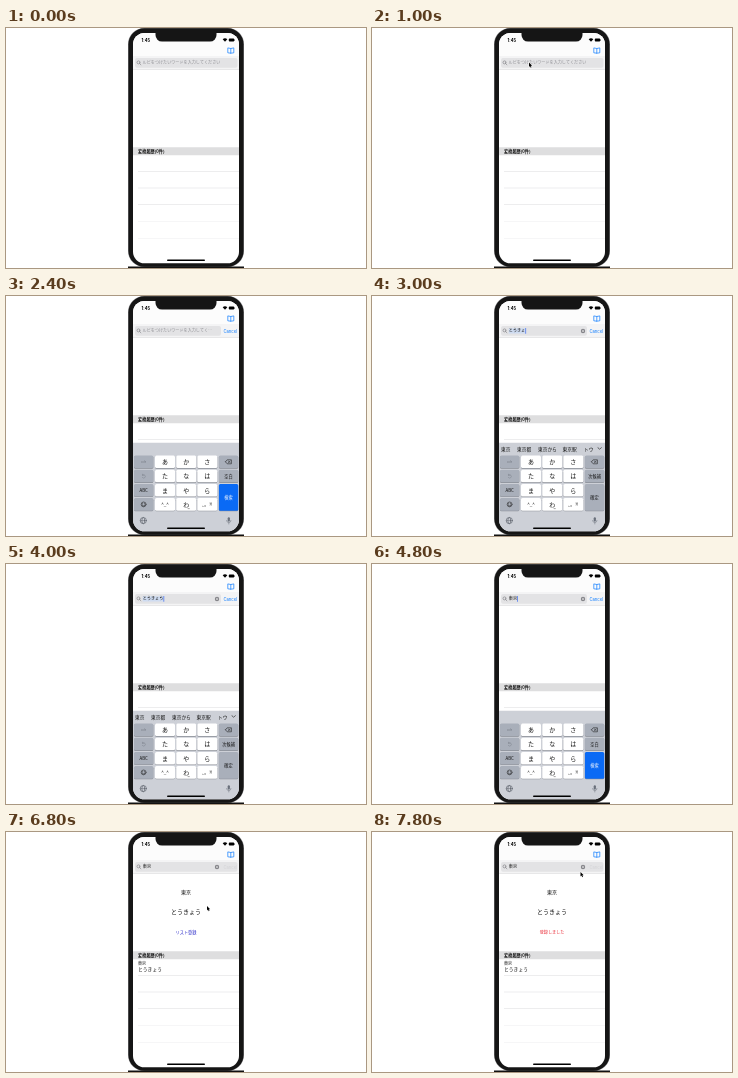
Recreate the animation shown at these times as an HTML page with a canvas. Size 360 px wide and 240 px high, loop 8 s.

```html
<!DOCTYPE html>
<html lang="ja">
<head>
<meta charset="utf-8">
<title>ルビ変換</title>
<style>
html, body { margin: 0; width: 100%; height: 100%; overflow: hidden; background: #fff; }
canvas { display: block; width: 360px; height: 240px; }
</style>
</head>
<body>
<canvas id="stage"></canvas>
<script>
const W = 360, H = 240, LOOP = 8000, STEP = 200;
const canvas = document.getElementById('stage');
const scale = window.devicePixelRatio || 1;
canvas.width = W * scale;
canvas.height = H * scale;
const ctx = canvas.getContext('2d');

const JP = '"Noto Sans CJK JP", "Noto Sans CJK", "Noto Sans", sans-serif';
const LATIN = 'Inter, sans-serif';
const BLUE = '#0a7aff', INK = '#111', GREY_KEY = '#a9afba';

// Pointer paths: [time, x, y]
const PATHS = [
  [[200, 221, 22], [400, 186, 58], [600, 145, 59], [800, 134, 42], [1000, 157, 34.5],
   [1600, 157, 34.5], [1800, 166, 46], [2000, 186, 75]],
  [[6400, 222, 20], [6800, 201, 74], [7200, 181, 98], [7400, 180, 98.5],
   [7600, 195, 74], [7800, 208.5, 40]]
];

function box(x, y, w, h, r, fill) {
  ctx.fillStyle = fill;
  ctx.beginPath();
  ctx.roundRect(x, y, w, h, r);
  ctx.fill();
}

function line(points, color, width = 0.6) {
  ctx.strokeStyle = color;
  ctx.lineWidth = width;
  ctx.lineCap = ctx.lineJoin = 'round';
  ctx.beginPath();
  points.forEach(([x, y]) => ctx.lineTo(x, y));
  ctx.stroke();
}

function arc(x, y, r, color, width, from = 0, to = Math.PI * 2) {
  ctx.strokeStyle = color;
  ctx.lineWidth = width;
  ctx.beginPath();
  ctx.arc(x, y, r, from, to);
  ctx.stroke();
}

function label(text, x, y, size, color = INK, align = 'left', weight = 400, family = JP) {
  ctx.font = `${weight} ${size}px ${family}`;
  ctx.fillStyle = color;
  ctx.textAlign = align;
  ctx.textBaseline = 'alphabetic';
  ctx.fillText(text, x, y + size * 0.37);
}

function statusBar() {
  label('1:45', 135.5, 12, 4.2, '#000', 'left', 700, LATIN);
  ctx.fillStyle = '#000';
  ctx.beginPath();
  ctx.moveTo(219, 13.7);
  ctx.arc(219, 13.7, 3.3, -Math.PI * 0.75, -Math.PI * 0.25);
  ctx.fill();
  box(222.8, 10.6, 5.4, 3, 0.8, '#000');
  box(228.5, 11.4, 0.5, 1.4, 0.2, '#000');
}

function bookIcon() {
  line([[224.8, 20.5], [224.8, 25.2], [221.8, 24.8], [221.8, 19.9],
        [224.8, 20.5], [227.8, 19.9], [227.8, 24.8], [224.8, 25.2]], BLUE, 0.7);
}

function searchBar(s) {
  box(127, 28, 106, 13.5, 0, '#f4f4f5');
  box(127, 41.5, 106, 0.4, 0, '#d5d5d7');
  box(129, 30, s.active ? 86 : 102.5, 9.7, 2, '#e3e3e5');
  arc(132.5, 34.4, 1.5, '#77777c', 0.6);
  line([[133.6, 35.5], [134.9, 36.8]], '#77777c');
  if (s.text) {
    const width = s.text.length * 4.1;
    if (s.marked) box(136.7, 32.3, width + 0.4, 5.2, 0, '#cfdcf1');
    label(s.text, 136.8, 34.9, 4.1);
    if (s.caret) box(137 + width, 32, 0.7, 5.8, 0, '#3c6cf0');
    box(208.8, 32.8, 4.4, 4.4, 2.2, '#85858a');
    line([[210.3, 34.3], [211.7, 35.7]], '#fff', 0.5);
    line([[211.7, 34.3], [210.3, 35.7]], '#fff', 0.5);
  } else {
    const hint = s.active ? 'ルビをつけたいワードを入力してく…' : 'ルビをつけたいワードを入力してください';
    label(hint, 136.6, 34.9, 4.1, '#8e8e93');
    if (s.caret) box(136.2, 32, 0.7, 5.8, 0, '#3c6cf0');
  }
  if (s.active || s.text)
    label('Cancel', 217.4, 35, 4.2, s.active ? BLUE : '#d3d3d6', 'left', 400, LATIN);
}

function history(s) {
  box(127, 119.3, 106, 8, 0, '#dededf');
  label('変換履歴(0件)', 132, 123.4, 4.2, INK, 'left', 700);
  for (let i = 0; i < 5; i++) box(132, 143 + i * 16.8, 101, 0.4, 0, '#dcdcde');
  if (s.result) {
    label('東京', 132, 131.7, 4);
    label('とうきょう', 132, 137.6, 4.8);
  }
}

function result(s) {
  label('東京', 180, 60, 5, INK, 'center');
  label('とうきょう', 180, 79.3, 6, INK, 'center');
  if (s.saved) label('登録しました', 180, 100.3, 4.1, '#e8202c', 'center');
  else label('リスト登録', 180, 100.3, 4.2, '#2727c8', 'center');
}

function key(col, y, h, text, fill, color = INK, size = 6) {
  const x = [128, 149, 170.2, 191.3, 212.9][col];
  const w = col % 4 ? 20 : 19.3;
  box(x, y + 0.6, w, h, 1.5, '#8b8e96');
  box(x, y, w, h, 1.5, fill);
  if (text) label(text, x + w / 2, y + h / 2 + 0.1, size, color, 'center');
}

function keyboard(s) {
  ctx.save();
  ctx.translate(0, s.drop);
  box(127, 146.8, 106, 90, 0, '#cdd0d7');
  const rows = ['あかさ', 'たなは', 'まやら'];
  const side = ['', '', 'ABC', ''];
  for (let r = 0; r < 4; r++) {
    const y = 159.5 + r * 14.2;
    key(0, y, 12.6, side[r], GREY_KEY, INK, 4.4);
    const keys = rows[r] || ['^_^', 'わ', '、。?!'];
    for (let c = 0; c < 3; c++) key(c + 1, y, 12.6, keys[c], '#fff', INK, r < 3 || c === 1 ? 6 : 4.6);
  }
  key(4, 159.5, 12.6, '', GREY_KEY);
  key(4, 173.7, 12.6, s.marked ? '次候補' : '空白', GREY_KEY, INK, 4.2);
  if (s.marked) key(4, 187.9, 26.8, '確定', GREY_KEY, INK, 4.2);
  else key(4, 187.9, 26.8, '検索', s.pressed ? '#e9ebef' : '#0a6af5', s.pressed ? INK : '#fff', 4.2);

  line([[135.2, 166], [139.8, 166], [138.6, 164.9]], '#686d76', 0.5);
  arc(137.6, 180.4, 1.7, '#7b808a', 0.5, -2.2, 2.4);
  line([[136.4, 178], [136.5, 179.4], [137.8, 179.2]], '#7b808a', 0.5);
  arc(137.6, 208.4, 2.4, '#222', 0.6);
  arc(137.6, 208.7, 1.3, '#222', 0.6, 0.1, 3.04);
  box(136.4, 207.2, 0.7, 0.8, 0.3, '#222');
  box(138.2, 207.2, 0.7, 0.8, 0.3, '#222');
  line([[219.5, 165.8], [221.2, 163.8], [225.4, 163.8], [225.4, 167.8], [221.2, 167.8], [219.5, 165.8]], '#222', 0.6);
  line([[222.3, 164.9], [224.1, 166.7]], '#222', 0.5);
  line([[224.1, 164.9], [222.3, 166.7]], '#222', 0.5);
  line([[181.8, 212.6], [183.4, 212.6]], '#333', 0.4);

  arc(137.3, 224.6, 3.1, '#545a64', 0.6);
  ctx.beginPath();
  ctx.ellipse(137.3, 224.6, 1.4, 3.1, 0, 0, Math.PI * 2);
  ctx.stroke();
  line([[134.3, 224.6], [140.3, 224.6]], '#545a64', 0.5);
  box(221.7, 221.2, 2.2, 4.5, 1.1, '#6a707b');
  arc(222.8, 224.4, 2.2, '#6a707b', 0.5, 0, Math.PI);
  line([[222.8, 226.6], [222.8, 228]], '#6a707b', 0.5);

  if (s.marked) {
    const words = [['東京', 129], ['東京都', 145], ['東京から', 166], ['東京駅', 190.5], ['トウ', 212]];
    words.forEach(([word, x]) => label(word, x, 153.1, 4.7));
    line([[225.8, 151.7], [227.6, 153.2], [229.4, 151.7]], '#333', 0.7);
  }
  ctx.restore();
}

function pointer(t) {
  for (const path of PATHS) {
    const i = path.findIndex(p => p[0] >= t);
    if (i < 0 || t < path[0][0]) continue;
    const b = path[i], a = path[Math.max(0, i - 1)];
    const k = b === a ? 0 : (t - a[0]) / (b[0] - a[0]);
    ctx.save();
    ctx.translate(a[1] + (b[1] - a[1]) * k, a[2] + (b[2] - a[2]) * k);
    ctx.beginPath();
    [[0, 0], [0, 4.5], [1, 3.6], [1.7, 5.2], [2.5, 4.8], [1.8, 3.3], [3.2, 3.2]]
      .forEach(([x, y]) => ctx.lineTo(x, y));
    ctx.closePath();
    ctx.strokeStyle = '#fff';
    ctx.lineWidth = 0.8;
    ctx.stroke();
    ctx.fillStyle = '#000';
    ctx.fill();
    ctx.restore();
  }
}

function typed(t) {
  if (t < 2600) return '';
  if (t >= 4200) return '東京';
  return 'とうきょう'.slice(0, t < 2800 ? 1 : t < 3000 ? 2 : t < 3200 ? 4 : 5);
}

function stateAt(t) {
  const active = t >= 1400 && t < 5400;
  return {
    active,
    text: typed(t),
    marked: t >= 2600 && t < 4200,
    caret: active && !(t >= 2000 && t < 2600),
    drop: t < 1600 ? 7.6 : t < 5200 ? 0 : 46,
    pressed: t >= 5000,
    result: t >= 5400,
    saved: t >= 7600
  };
}

function draw(t) {
  const s = stateAt(t);
  ctx.setTransform(scale, 0, 0, scale, 0, 0);
  box(0, 0, W, H, 0, '#fff');
  box(122, 0, 116, 239, 16, '#9a9a9c');
  box(122.4, 0.2, 115.2, 238.6, 16, '#151515');
  box(122, 238.4, 116, 1.6, 0, '#111');

  ctx.save();
  ctx.beginPath();
  ctx.roundRect(127, 5, 106, 230.3, 11.5);
  ctx.clip();
  box(127, 5, 106, 231, 0, '#fff');
  box(127, 5, 106, 23, 0, '#fcfcfc');
  statusBar();
  bookIcon();
  searchBar(s);
  history(s);
  if (s.result) result(s);
  if (s.active) keyboard(s);
  box(161, 231.4, 38, 1.5, 0.75, '#000');
  ctx.restore();

  box(149.5, 3, 61, 10.6, [0, 0, 6.5, 6.5], '#151515');
  pointer(t);
}

function tick() {
  const t = performance.now() % LOOP;
  draw(Math.floor(t / STEP) * STEP);
  requestAnimationFrame(tick);
}
tick();
</script>
</body>
</html>
```
